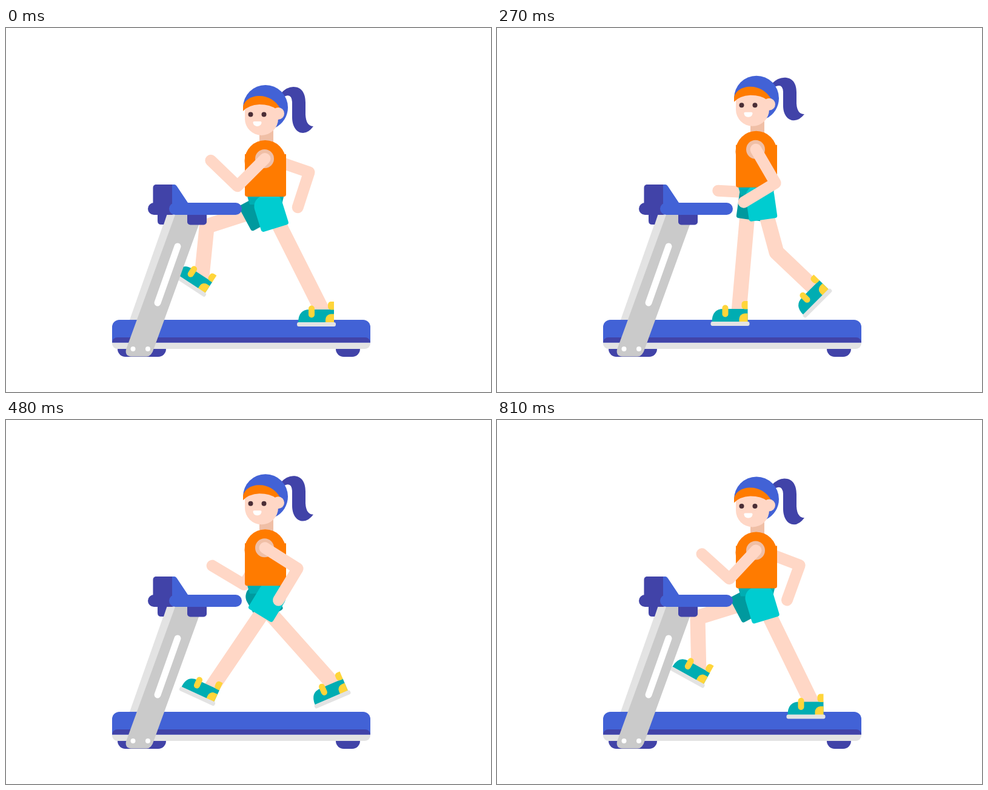
Animation, 800 px wide and 600 px high, one loop 840 ms. Source, as an HTML page with a canvas:

```html
<!DOCTYPE html>
<html lang="en">
<head>
<meta charset="utf-8">
<title>Treadmill run</title>
<style>
html, body { margin: 0; height: 100%; overflow: hidden; background: #fff; }
canvas { display: block; }
</style>
</head>
<body>
<canvas id="stage" width="800" height="600"></canvas>
<script>
const c = document.getElementById('stage').getContext('2d');
const LOOP = 840, STEP = 30, TURN = 2 * Math.PI, DEG = Math.PI / 180;
const THIGH = 88, SHIN = 93;
const BLUE = '#4262d6', NAVY = '#4143a8', ORANGE = '#ff7b00', SKIN = '#ffd7c6', SHADE = '#f0bfa6',
  CYAN = '#00ccd0', TEAL = '#00adb2', DEEP = '#00999e', YELLOW = '#ffd53a', PALE = '#e3e3e3', GREY = '#cacaca';

// Key points of each stride: time, sole x and y, tilt in degrees.
const nearStride = [[0, 512, 488.5, 0], [120, 557, 424, -58], [270, 528.5, 453.5, -45],
  [390, 337.5, 433, 27], [570, 352.5, 484, 5], [690, 423.5, 491, 0], [810, 509.5, 489, 0]];
const farStride = [[120, 324.5, 453.5, 16], [270, 384.5, 487.5, 0], [390, 492.5, 487, 0],
  [420, 510, 488, 0], [570, 545, 415, -64], [690, 449, 472, -37], [810, 314, 424, 29]];

const bounce = t => -10 + 10 * Math.cos(2 * TURN * (t + 8) / LOOP);
const swing = t => (Math.cos(TURN * t / LOOP) + .05 * Math.cos(3 * TURN * t / LOOP)) / 1.05;

// Periodic smooth curve through the key points.
function along(keys, t) {
  const n = keys.length;
  const key = i => {
    const [time, ...values] = keys[(i + n) % n];
    return [time + Math.floor(i / n) * LOOP, values];
  };
  const next = keys.findIndex(k => k[0] > t);
  const i = (next < 0 ? n : next) - 1;
  const [[ta, a], [tb, b], [td, d], [te, e]] = [i - 1, i, i + 1, i + 2].map(key);
  const h0 = tb - ta, h = td - tb, h2 = te - td, u = (t - tb) / h, v = 1 - u;
  return b.map((p, k) => {
    const q = d[k], s0 = (p - a[k]) / h0, s = (q - p) / h, s2 = (e[k] - q) / h2;
    const m = (h0 * s + h * s0) / (h0 + h), m2 = (h * s2 + h2 * s) / (h + h2);
    return p * (1 + 2 * u) * v * v + q * u * u * (3 - 2 * u) + h * u * v * (m * v - m2 * u);
  });
}

function box(color, x, y, w, h, r = 0) {
  c.fillStyle = color;
  c.beginPath();
  c.roundRect(x, y, w, h, r);
  c.fill();
}
function dot(color, x, y, r) {
  c.fillStyle = color;
  c.beginPath();
  c.arc(x, y, r, 0, TURN);
  c.fill();
}
function shape(color, d) {
  c.fillStyle = color;
  c.fill(new Path2D(d));
}
function limb(color, width, cap, ...points) {
  c.strokeStyle = color;
  c.lineWidth = width;
  c.lineCap = cap;
  c.lineJoin = 'round';
  c.beginPath();
  points.forEach(p => c.lineTo(...p));
  c.stroke();
}
function at(x, y, degrees, draw) {
  c.save();
  c.translate(x, y);
  c.rotate(degrees * DEG);
  draw();
  c.restore();
}

// Angles of limbs count from straight down, positive towards the back.
const reach = ([x, y], length, angle) =>
  [x + length * Math.sin(angle * DEG), y + length * Math.cos(angle * DEG)];

function arm(shoulder, upper, angle) {
  const elbow = reach(shoulder, upper, angle);
  limb(SKIN, 19, 'round', shoulder, elbow, reach(elbow, 61, angle - 89));
}

// Places the ankle by the shoe and bends the knee forward to fit.
function poseLeg(stride, t, hipX, hipY) {
  const [x, y, tilt] = along(stride, t);
  const cos = Math.cos(tilt * DEG), sin = Math.sin(tilt * DEG);
  const ankle = [x + 14 * (cos + sin), y + 14 * (sin - cos)];
  const dx = ankle[0] - hipX, dy = ankle[1] - hipY, dist = Math.hypot(dx, dy);
  const forth = (dist * dist + THIGH * THIGH - SHIN * SHIN) / (2 * dist);
  const out = Math.sqrt(Math.max(0, THIGH * THIGH - forth * forth));
  const knee = [hipX + (dx * forth - dy * out) / dist, hipY + (dy * forth + dx * out) / dist];
  const thigh = Math.atan2(knee[0] - hipX, knee[1] - hipY) / DEG;
  return { points: [[hipX, hipY], knee, ankle], shoe: [x, y, tilt], cloth: .8 * thigh - 4 };
}

function shoe(x, y, tilt) {
  at(x, y, tilt, () => {
    shape(TEAL, 'M-30 -3 Q-30 -24.5 -11 -24.5 H29 V-3 Z');
    box(YELLOW, 19, -37.5, 10, 13.5, [5, 0, 0, 5]);
    box(YELLOW, 15, -17, 14, 14, [9, 0, 0, 0]);
    box(YELLOW, -13, -31, 10, 20, 5);
    box(PALE, -32, -3.5, 64, 7, 3);
  });
}
function shorts(color, x, y, angle) {
  at(x, y, -angle, () => box(color, -23.5, -26, 47, 57.5, [18, 18, 4, 4]));
}

function head(lift) {
  c.save();
  c.translate(0, 97);
  c.scale(1, 1 + lift * .0047);
  shape(NAVY, 'M453 11 Q463 0 474 0 C488 0 494 11 494 26 V46 Q495 65 507 65 Q499 76 490 76 C479 76 472 65 472 50 V25 Q471 10 459 16 Z');
  c.restore();
  box(SHADE, 418, 160, 23, 35);
  c.fillStyle = BLUE;
  c.beginPath();
  c.arc(428, 131, 37, Math.PI, 1.12);
  c.fill();
  shape(SKIN, 'M394 131 Q421 112 449 131 V149.5 A27.5 27.5 0 0 1 394 149.5 Z');
  shape(ORANGE, 'M391 137 V131 C392 120 403 112 418 112 C433 112 445 120 452 132 L446 134 Q436 126 418 126 Q400 127 391 137 Z');
  dot(SKIN, 449, 141, 10);
  dot('#4a2e36', 403.5, 142.5, 4);
  dot('#4a2e36', 425.5, 142.5, 4);
  box('#fff', 407.5, 154, 14, 8, [2, 2, 7, 7]);
}

function runner(t) {
  const lift = bounce(t), sway = 55 * swing(t), hip = 300 + lift;
  const near = poseLeg(nearStride, t, 438, hip), far = poseLeg(farStride, t, 415, hip);

  arm([431, 214 + lift], 73, 16 + sway);
  limb(SKIN, 25, 'butt', ...far.points);
  shorts(DEEP, 422, hip, far.cloth);
  limb(SKIN, 25, 'butt', ...near.points);
  shoe(...far.shoe);
  shoe(...near.shoe);
  at(0, lift, 0, () => shape(TEAL, 'M397 274 H459 L455 291 H402 Z'));
  shorts(CYAN, 435, hip, near.cloth);

  at(0, lift, 0, () => {
    head(lift);
    dot(ORANGE, 427.5, 219, 34);
    box(ORANGE, 394, 208, 68, 70, [0, 0, 4, 4]);
    dot(SHADE, 426.5, 215.5, 15.5);
  });
  arm([427, 215.5 + lift], 64, 10 - sway);
}

function deck() {
  box(NAVY, 184, 525, 80, 17, [0, 0, 13, 13]);
  box(NAVY, 544, 525, 40, 17, [0, 0, 13, 13]);
  box(PALE, 175, 517, 426, 12, [0, 0, 9, 9]);
  box(BLUE, 175, 481, 426, 37.5, [12, 12, 0, 0]);
  box(NAVY, 175, 510, 426, 8.5, [9, 9, 0, 0]);
}

function stand() {
  shape(PALE, 'M265 308 H290 L228 481 H204 Z');
  shape(GREY, 'M279 308 H324 L244 528 Q240 541.5 232 541.5 H207 Q196 541 198 530 Z');
  limb('#fff', 11, 'round', [283, 360], [250, 453]);
  dot('#fff', 209.5, 529, 4);
  dot('#fff', 234, 529, 4);
  shape(NAVY, 'M250 306 H266 L260 324 H256 Q250 324 250 318 Z');
  box(NAVY, 299, 300, 32, 24.5, 5);
  box(NAVY, 242.5, 258, 36, 45, 5);
  box(NAVY, 234, 288, 50, 20, 10);
  shape(BLUE, 'M274 258 H278 Q280 258 282 261 L300 288 V300 H274 Z');
  box(BLUE, 269, 288, 120, 20, 10);
}

function frame(now) {
  const t = Math.floor(now % LOOP / STEP) * STEP;
  c.clearRect(0, 0, 800, 600);
  deck();
  runner(t);
  stand();
  requestAnimationFrame(frame);
}
frame(0);
</script>
</body>
</html>
```
